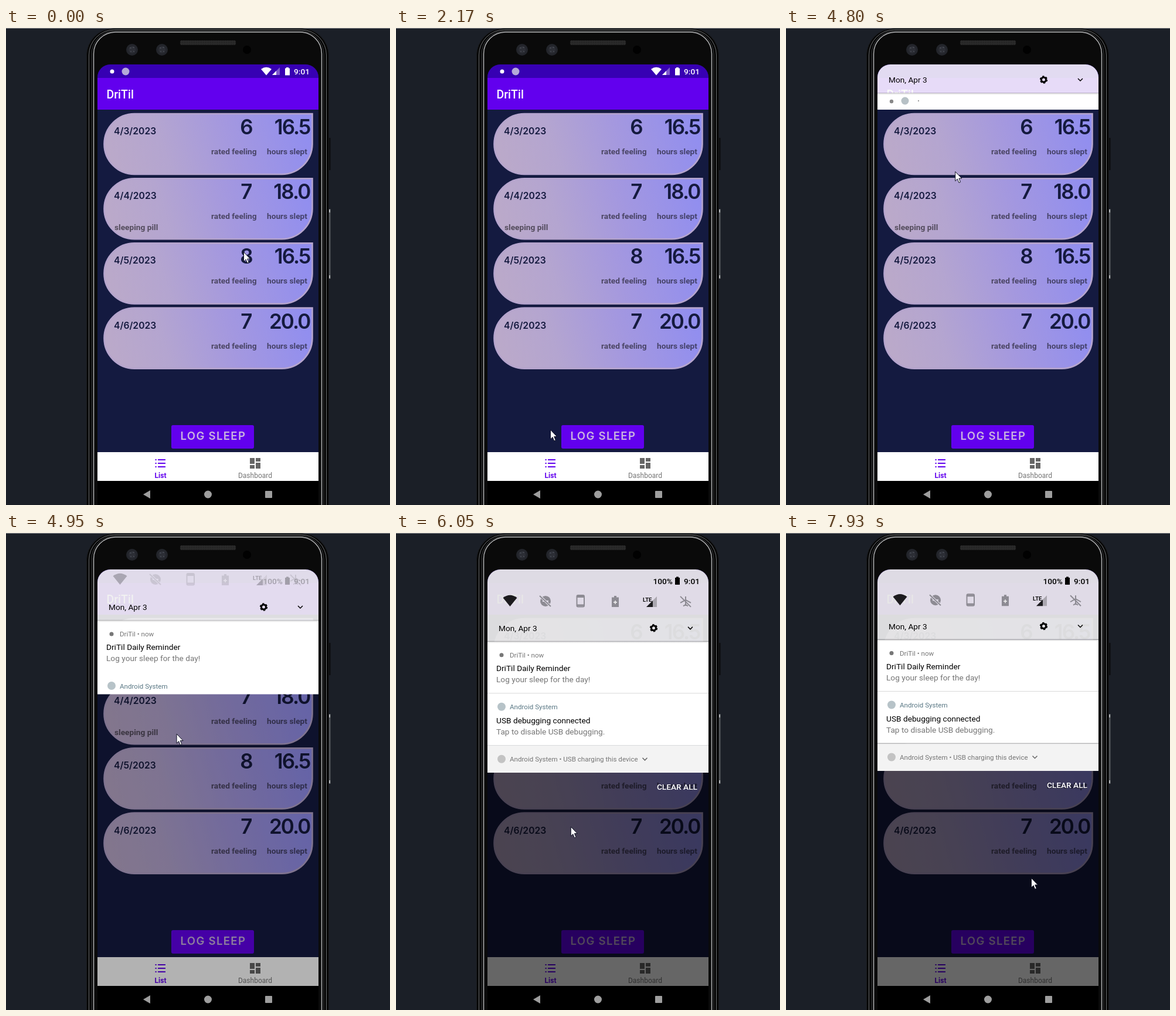
An HTML page that plays this animation: 655 by 812 pixels, repeating every 8 s.

```html
<!DOCTYPE html>
<html lang="en">
<head>
<meta charset="utf-8">
<title>Sleep log</title>
<style>
  html, body { margin: 0; width: 100%; height: 100%; overflow: hidden; background: #1b1f27; }
  svg { display: block; width: 655px; height: 812px; }
  text { font-family: Roboto, Arial, sans-serif; font-size: 13.7px; }
  .geo { font-family: Inter, "Open Sans", sans-serif; font-weight: 600; fill: #151a3f; }
  .num { font-size: 35px; letter-spacing: -1.9px; }
  .date { font-size: 15.7px; }
  .action { font-size: 18.6px; letter-spacing: 1.3px; fill: #cbb5df; }
  .label { font-weight: 700; fill: #000; fill-opacity: .55; }
  .small { font-size: 11.6px; fill: #757575; }
  .tab { font-size: 12px; text-anchor: middle; }
  .soft { fill: #757575; }
  .bold { font-weight: 500; }
  .end { text-anchor: end; }
  .mid { text-anchor: middle; }
</style>
</head>
<body>
<svg viewBox="0 0 655 812">
  <defs>
    <clipPath id="screen"><path d="M156 812V84a22 22 0 0 1 22-22H511a22 22 0 0 1 22 22V812Z"/></clipPath>
    <clipPath id="shade"><rect id="shadeBox" x="156" y="62" width="377" height="77"/></clipPath>
    <linearGradient id="tint" gradientUnits="userSpaceOnUse" x1="166" y1="250" x2="523" y2="145">
      <stop offset="0" stop-color="#bcaac8"/>
      <stop offset=".3" stop-color="#b4a5d0"/>
      <stop offset=".6" stop-color="#a498df"/>
      <stop offset="1" stop-color="#8f8df1"/>
    </linearGradient>
    <linearGradient id="fade" x2="0" y2="1">
      <stop offset="0" stop-color="#000" stop-opacity=".2"/>
      <stop offset="1" stop-color="#000" stop-opacity="0"/>
    </linearGradient>
    <pattern id="mesh" width="3" height="3" patternUnits="userSpaceOnUse">
      <rect width="3" height="3" fill="#2d2d2d"/><circle cx="1" cy="1" r=".8" fill="#101010"/>
    </pattern>
    <g id="lens">
      <circle r="10" fill="#23252b"/><circle r="6" fill="#2c2e35"/>
      <path d="M-4-3h3M1-4h3M-3 3h2M2 2l2 2" stroke="#555963"/>
    </g>
    <path id="wifi" d="M0 0L-9-10.500Q0-17 9-10.500Z"/>
    <path id="chevron" d="M-4-2L0 2L4-2" fill="none" stroke-width="1.500"/>
  </defs>

  <rect width="655" height="812" fill="#1b1f27"/>
  <rect width="655" height="1" fill="#85888d"/>

  <!-- phone body -->
  <path d="M551.500 187V242" stroke="#0c0d0f" stroke-width="4"/>
  <path d="M551.500 308V427" stroke="#55585c" stroke-width="4"/>
  <path d="M551.500 309v5M551.500 421v5" stroke="#b5b7ba" stroke-width="3"/>
  <g fill="none">
    <rect x="137.500" y="1" width="413" height="900" rx="46" fill="#060606" stroke="#191a1c"/>
    <rect x="141.500" y="3" width="405" height="900" rx="43" stroke="#6c6e71"/>
    <rect x="146" y="5" width="396" height="900" rx="40" stroke="#3c3e40"/>
    <rect x="149.500" y="7" width="389" height="900" rx="37" fill="#0a0a0a" stroke="#b4b5b7" stroke-width="1.500"/>
  </g>
  <rect x="297" y="21" width="95" height="8" rx="2" fill="url(#mesh)"/>
  <use href="#lens" x="215" y="37"/>
  <use href="#lens" x="266" y="37"/>
  <circle cx="411" cy="37" r="7" fill="#010101"/>

  <g clip-path="url(#screen)">
    <rect x="156" y="62" width="377" height="750" fill="#141a40"/>
    <rect x="156" y="62" width="377" height="23" fill="#3700b3"/>
    <rect x="156" y="85" width="377" height="54" fill="#6200ee"/>
    <g id="bar" fill="#fff">
      <circle cx="181" cy="74" r="3.500"/>
      <circle cx="204" cy="74" r="6.500" fill="#b4aad8"/>
      <use href="#wifi" x="444" y="80.500"/>
      <path d="M454 80L467 67V80Z" opacity=".35"/>
      <path d="M454 80L461 73V80Z"/>
      <path d="M476 68.500h2V67h4v1.500h2V80.500h-8Z"/>
      <text class="bold" x="491" y="79">9:01</text>
    </g>
    <text class="bold" x="171.500" y="120" fill="#fff" style="font-size:19.500px">DriTil</text>
    <g id="cards"></g>
    <rect x="282" y="676" width="141" height="40" rx="3" fill="#6200ee"/>
    <text class="geo action" x="297.500" y="700.500">LOG SLEEP</text>

    <rect x="156" y="722" width="377" height="49" fill="#fff"/>
    <g stroke="#6200ee" stroke-width="2">
      <path d="M259 735H272M259 741H272M259 747H272"/>
      <path d="M254.500 735h2.200M254.500 741h2.200M254.500 747h2.200"/>
    </g>
    <text class="tab" x="263.500" y="766" style="font-weight:700;fill:#6200ee">List</text>
    <path d="M416 732h8v10h-8ZM426 732h8v6h-8ZM416 744h8v6h-8ZM426 740h8v10h-8Z" fill="#666"/>
    <text class="tab soft" x="425" y="766">Dashboard</text>

    <rect id="dim" x="156" y="62" width="377" height="709" opacity="0"/>
    <rect x="156" y="771" width="377" height="41"/>
    <g fill="#9e9e9e">
      <path d="M234 794L246 787V801Z"/>
      <circle cx="344.500" cy="794" r="6.500"/>
      <rect x="442" y="788" width="12" height="12" rx="1"/>
    </g>

    <!-- notification shade -->
    <g id="panel">
      <g clip-path="url(#shade)">
        <rect id="head" x="156" y="62" width="377" height="47" fill="#fafafa" opacity=".88"/>
        <g id="status">
          <text class="bold" x="438.500" y="87">100%</text>
          <path d="M476 76h2v-1.500h4v1.500h2V88h-8Z"/>
          <text class="bold" x="491" y="87">9:01</text>
        </g>
        <g id="tiles" fill="none" stroke="#8d8b93" stroke-width="2">
          <use href="#wifi" transform="translate(194.500 9) scale(1.330 1.400)" fill="#1c1b1e" stroke="none"/>
          <circle cx="255" r="9" fill="#8d8b93" stroke="none"/>
          <path d="M250 0h10" stroke="#e1dde8"/>
          <path d="M245-9L265 10" stroke="#e1dde8" stroke-width="4"/>
          <path d="M245-9L264 9"/>
          <rect x="308.500" y="-10" width="12.500" height="19.500" rx="2"/>
          <path d="M308-7.500h13M308 7h13" stroke-width="3"/>
          <path d="M368-6.500h4v-2.500h4v2.500h4V10h-12Z" fill="#8d8b93" stroke="none"/>
          <path d="M371 2h6M374-1v6" stroke="#eee" stroke-width="1.600"/>
          <path d="M427 10L445-8V10Z" fill="#aaa7af" stroke="none"/>
          <path d="M427 10L438-1V10Z" fill="#1c1b1e" stroke="none"/>
          <text x="421" y="1" stroke="none" fill="#111" style="font-size:9.500px;font-weight:700">LTE</text>
          <path d="M494-8V8M485 3L494-2L503 3M490 8.500L494 6L498 8.500M485-8L503 10"/>
        </g>
        <g id="body">
          <text x="175" y="5">Mon, Apr 3</text>
          <circle cx="439.500" r="4" fill="none" stroke="#000" stroke-width="3"/>
          <circle cx="439.500" r="5.700" fill="none" stroke="#000" stroke-width="2" stroke-dasharray="3.200 2.770"/>
          <use href="#chevron" x="502" stroke="#000"/>

          <rect x="156" y="23" width="377" height="177" fill="#fff"/>
          <rect x="156" y="22" width="377" height="4" fill="url(#fade)"/>
          <g id="rows">
            <circle cx="180" cy="46" r="3.500" fill="#777"/>
            <text class="small" x="194" y="50">DriTil • now</text>
            <text x="171" y="73">DriTil Daily Reminder</text>
            <text class="soft" x="171" y="92">Log your sleep for the day!</text>
            <circle cx="180" cy="134" r="7" fill="#b7c3c8"/>
            <text class="small" x="194" y="138.500" style="fill:#587683">Android System</text>
            <text x="171" y="162">USB debugging connected</text>
            <text class="soft" x="171" y="181">Tap to disable USB debugging.</text>
            <rect x="156" y="200" width="377" height="47" fill="#f3f3f3"/>
            <circle cx="180" cy="223" r="7" fill="#c3c3c3"/>
            <text class="small" x="194" y="227">Android System • USB charging this device</text>
            <use href="#chevron" x="424.500" y="223" stroke="#666"/>
            <path id="line1" d="M156 111H533" stroke="#d9d9d9"/>
            <path id="line2" d="M156 199.500H533" stroke="#b5b5b5"/>
          </g>
          <g id="mini">
            <circle cx="180" cy="37" r="3.200" fill="#888"/>
            <circle cx="203" cy="36" r="6.500" fill="#b7c1c6"/>
            <circle cx="226" cy="36" r="1" fill="#777"/>
          </g>
        </g>
      </g>
      <text id="clear" class="bold end" x="514" fill="#fff">CLEAR ALL</text>
    </g>
  </g>

  <path id="pointer" d="M.500.500V16.500L4.100 13L6.700 19.300L9.300 18.200L6.700 12H11.500Z" fill="#fff" stroke="#101225" stroke-linejoin="round"/>
</svg>

<script>
const LOOP = 8000;
const $ = id => document.getElementById(id);
const ramp = (t, from, to) => Math.max(0, Math.min(1, (t - from) / (to - from)));

const nights = [
  ['4/3/2023', 6, '16.5', ''],
  ['4/4/2023', 7, '18.0', 'sleeping pill'],
  ['4/5/2023', 8, '16.5', ''],
  ['4/6/2023', 7, '20.0', '']
];
$('cards').innerHTML = nights.map(([date, mood, hours, note], i) => `
  <g transform="translate(0 ${i * 110.2})">
    <path d="M219 146H522.500V197.500A52 52 0 0 1 470.500 249H219A51.500 51.500 0 0 1 219 146Z"
      fill="url(#tint)" stroke="#b5a4cd" stroke-width="2.600"/>
    <text class="geo date" x="184" y="181">${date}</text>
    <text class="geo num mid" x="409.500" y="181">${mood}</text>
    <text class="geo num end" x="518.500" y="181">${hours}</text>
    <text class="label" x="350" y="215">rated feeling</text>
    <text class="label" x="445" y="215">hours slept</text>
    <text class="label" x="185" y="233.500">${note}</text>
  </g>`).join('');

// Stepped pointer moves; "bend" is the control point of a quadratic curve
const home = [405, 381];
const moves = [
  { start: 120, end: 1020, steps: 8, to: [300, 135], bend: [-120, 840] },
  { start: 1170, end: 1740, steps: 5, to: [263, 682], bend: [560, 820] },
  { start: 2170, end: 2320, steps: 2, to: [263, 685] },
  { start: 2720, end: 3020, steps: 3, to: [396, 736] },
  { start: 3300, end: 3300, steps: 1, to: [438, 752] },
  { start: 4040, end: 4481, steps: 4, to: [290, 49] },
  { start: 4629, end: 5070, steps: 4, to: [295, 439], bend: [284, 244] },
  { start: 5190, end: 5460, steps: 3, to: [299, 512], bend: [295, 525] },
  { start: 6050, end: 6950, steps: 8, to: [343, 234], bend: [290, 475] },
  { start: 7100, end: 7250, steps: 2, to: [429, 234] },
  { start: 7520, end: 7930, steps: 4, to: [418, 587], bend: [376, 680] }
];

// Time of the latest step and the pointer's place at it
function poseAt(t) {
  const i = moves.filter(m => m.start <= t).length - 1;
  if (i < 0) return { now: 0, spot: home };
  const { start, end, steps, to, bend } = moves[i];
  const from = i ? moves[i - 1].to : home;
  const done = Math.floor(ramp(t, start, end || 1) * (steps - 1) + 1e-6);
  const step = t >= end ? steps - 1 : done;
  const k = (step + 1) / steps;
  const spot = to.map((b, axis) => {
    const a = from[axis];
    const c = bend ? bend[axis] : (a + b) / 2;
    return a * (1 - k) ** 2 + 2 * c * k * (1 - k) + b * k * k;
  });
  return { now: start + (end - start) * step / Math.max(1, steps - 1), spot };
}

const alpha = (id, v) => $(id).setAttribute('opacity', v);
const place = (id, x, y) => $(id).setAttribute('transform', `translate(${x} ${y})`);

function draw(t) {
  const { now, spot } = poseAt(t);
  place('pointer', ...spot);

  const open = now > 4700;
  alpha('panel', open ? 1 : 0);
  alpha('bar', open ? 0 : 1);
  const pull = ramp(now, 4776, 5070);
  const lift = 5.5 * ramp(now, 5460, 6950);
  const head = 88 + 76 * pull - lift;
  const bottom = 139 + 271 * pull - lift * .9;
  const icons = ramp(head, 115, 155);

  $('shadeBox').setAttribute('height', bottom - 62);
  $('head').setAttribute('height', head - 39);
  place('body', 0, head);
  place('tiles', 0, head - 47 + lift / 2);
  place('clear', 0, head + 275);
  alpha('dim', .6 * pull);
  alpha('clear', ramp(now, 5070, 5410));
  alpha('status', icons);
  alpha('tiles', icons);
  alpha('rows', pull > 0 ? 1 : 0);
  alpha('mini', pull > 0 ? 0 : 1);
  alpha('line1', now > 5400 ? 1 : 0);
  alpha('line2', now > 6100 ? 1 : 0);
}

const begin = performance.now();
function frame() {
  draw((performance.now() - begin) % LOOP);
  requestAnimationFrame(frame);
}
frame();
</script>
</body>
</html>
```
